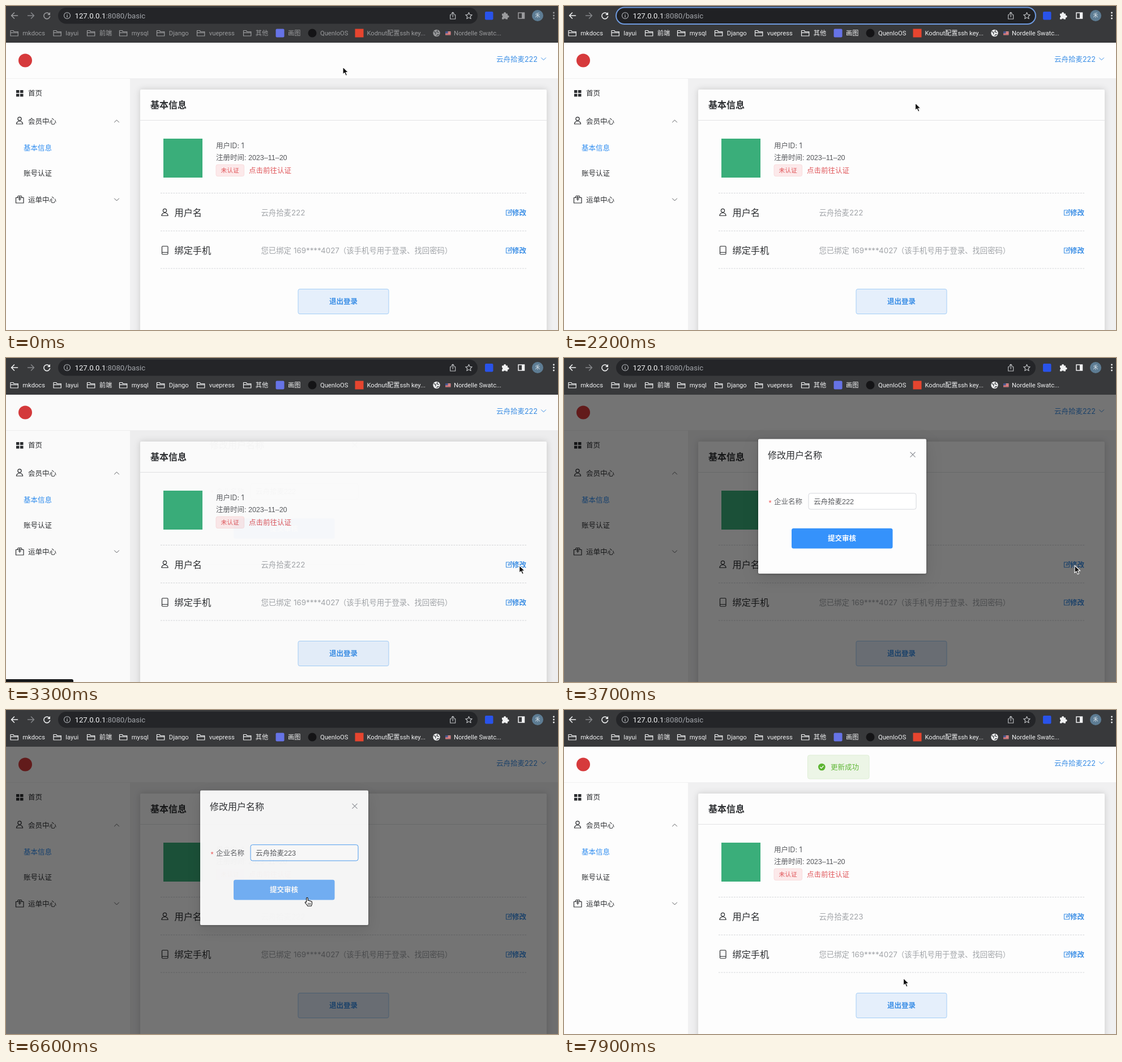
Animation of 975x574 px, one loop 8000 ms. Source, as an HTML page:

```html
<!DOCTYPE html>
<html lang="zh-CN">
<head>
<meta charset="utf-8">
<title>基本信息</title>
<style>
html, body { margin: 0; width: 100%; height: 100%; overflow: hidden; background: #fdfdfd; }
svg { display: block; width: 100vw; height: 100vh; }
text { font-family: Inter, "Noto Sans CJK SC", "Noto Sans CJK", sans-serif; font-feature-settings: "calt" 0; white-space: pre; }
.chrome text { font-family: Roboto, "Noto Sans CJK SC", "Noto Sans CJK", sans-serif; }
.arial { font-family: "Liberation Sans", "Noto Sans CJK SC", "Noto Sans CJK", sans-serif; }
.cjk { font-family: "Noto Sans CJK SC", "Noto Sans CJK", sans-serif; }
.line { fill: none; stroke-linecap: round; stroke-linejoin: round; }
#card { filter: drop-shadow(0 0 6px rgba(0,0,0,.16)); }
#panel { filter: drop-shadow(0 1px 2px rgba(0,0,0,.25)) drop-shadow(0 8px 14px rgba(0,0,0,.1)); }
</style>
</head>
<body>
<svg id="stage" viewBox="0 0 975 574" preserveAspectRatio="none"></svg>
<script>
const LOOP = 8000;
const NAME = '云舟拾麦';
const BLUE = '#3a8ee6';
const INK = '#2c2e31';

// ---- drawing helpers (text is placed by its vertical centre) ----
const text = (x, cy, s, size = 12.5, fill = INK, more = '') =>
  `<text x="${x}" y="${cy + size * 0.37}" font-size="${size}" fill="${fill}" ${more}>${s}</text>`;
const rect = (x, y, w, h, fill, more = '') =>
  `<rect x="${x}" y="${y}" width="${w}" height="${h}" fill="${fill}" ${more}/>`;
const circle = (x, y, r, fill, more = '') =>
  `<circle cx="${x}" cy="${y}" r="${r}" fill="${fill}" ${more}/>`;
const line = (d, color, w = 1.1, more = '') =>
  `<path class="line" d="${d}" stroke="${color}" stroke-width="${w}" ${more}/>`;
const bold = 'font-weight="700"';
const semi = 'font-weight="500"';
const arial = 'class="arial"';

// ---- browser frame ----
function folder(x) {
  return line(`M${x} 43.5h4.5l1.8 2h7v7.5h-13.3zM${x} 47.3h13.3`, 'currentColor', 1.2);
}

function chrome() {
  const c = 'currentColor';
  const marks = [[8, 'mkdocs'], [84, 'layui'], [143.5, '前端'], [200.5, 'mysql'],
    [266.5, 'Django'], [337.5, 'vuepress'], [419.5, '其他']];
  const label = (x, s) => text(x, 48, s, 11.2, c);
  return `<g class="chrome" id="chrome">
    ${rect(0, 0, 975, 65, '#38393b')}
    ${rect(92, 3, 741, 28.5, '#242528', 'rx="14.2"')}
    <g id="ring">${rect(92, 2.5, 741, 29.5, '#202124', 'rx="14.7" stroke="#6f9be0" stroke-width="2"')}</g>
    ${line('M20.5 17h-11M14.5 12l-5 5 5 5', c, 1.6)}
    ${line('M38.5 17h11M44.5 12l5 5-5 5', '#85878a', 1.5)}
    ${line('M76.3 13.8A5.4 5.4 0 1 0 77.5 18.6', c, 1.6)}
    <path d="M78 11v5h-5z" fill="${c}"/>
    ${circle(108, 17, 5.5, 'none', 'stroke="#b4b7bb" stroke-width="1.1"')}
    ${line('M108 16.5v3.3M108 14.1v.1', '#b4b7bb', 1.3)}
    ${text(121.5, 17, '127.0.0.1<tspan fill="#a3a6ab">:8080/basic</tspan>', 13.2, '#f4f5f6')}
    ${line('M246.7 10.5v13.5', '#e8e8e8', 1, 'id="urlCaret"')}
    ${line('M787 15.5h-2.3v7.5h9v-7.5h-2.3M789.2 19.5v-8M786.7 13.7l2.5-2.5 2.5 2.5', '#c3c5c8', 1.1)}
    ${line('M817.5 11.5l1.7 3.8 4.1.4-3.1 2.8.9 4.1-3.6-2.2-3.6 2.2.9-4.1-3.1-2.8 4.1-.4z', '#c9cbce', 1.1)}
    ${rect(846, 10, 14.5, 14.5, '#2953ea', 'rx="2"')}
    <path d="M876 13.5h3.2a2 2 0 1 1 3.8 0h3v3.2a2 2 0 1 1 0 3.8v3h-3.2a1.9 1.9 0 0 0-3.6 0h-3.2v-3.2a1.9 1.9 0 0 0 0-3.6z" fill="${c}"/>
    ${rect(905, 12, 10.5, 10, 'none', `stroke="${c}" stroke-width="1.5"`)}${rect(911, 12, 4.5, 10, c)}
    ${circle(939, 17, 10, '#5d7c93')}
    ${text(934.5, 17, '禾', 9, '#e6edf2')}
    ${[12, 17, 22].map(y => circle(967.5, y, 1.4, c)).join('')}
    ${marks.map(([x, s]) => folder(x) + label(x + 21.3, s)).join('')}
    ${rect(476.5, 40.5, 15, 15, '#6673e6', 'rx="2"')}${label(498, '画图')}
    ${circle(541, 48, 7.5, '#141416')}${label(555, 'QuenloOS')}
    ${rect(616.5, 40.5, 15, 15, '#e6452f')}${label(637.5, 'Kodnut配置ssh key...')}
    ${circle(760.5, 48, 6.2, c)}
    ${line('M756 45.5l3 1.5-.5 2.5M762 43l-1 2.5 3 1.5M761 52.5l1.5-2 2 .3', '#505356', 1.5)}
    ${rect(776, 45, 9.5, 6.5, '#d9a0a0')}${line('M776.5 47h8.5M776.5 50h8.5', '#c43c44', 1)}${rect(776, 45, 4.5, 3.5, '#44558f')}
    ${label(791, 'Nordelle Swatc...')}
  </g>`;
}

// ---- page ----
const person = (x, y) =>
  circle(x, y - 3, 3.1, 'none', `stroke="${INK}" stroke-width="1.2"`) +
  line(`M${x - 5.6} ${y + 6}a5.6 5 0 0 1 11.2 0z`, INK, 1.2);

const edit = y => line(`M889 ${y - 4.2}h-5.5v9h9v-5.5M887 ${y + 1.3}l.4-1.9 5-5 1.6 1.6-5 5z`, BLUE) +
  text(894, y, '修改', 12.5, BLUE, bold);

const dashes = y => line(`M273 ${y}H919`, '#d3d5d8', 1, 'stroke-dasharray="2.7 1.8" style="stroke-linecap:butt"');

function page() {
  const grey = '#a2a5a9';
  const red = '#e0565a';
  return `
    ${rect(0, 65, 975, 509, '#fdfdfd')}
    ${rect(219, 128, 756, 446, '#f0f0f1')}
    ${rect(0, 128, 219, 1, '#f0f0f0')}
    ${circle(34, 96.5, 12, '#d63a3c')}
    ${text(866, 94, NAME + '222', 12.5, BLUE)}
    ${line('M945.5 91.8l4 4 4-4', BLUE, 1)}

    ${[[18, 149], [25, 149], [18, 155.5], [25, 155.5]].map(([x, y]) => rect(x, y, 5.5, 5, INK)).join('')}
    ${text(39, 154, '首页')}
    ${person(24, 203)}${text(39, 204, '会员中心')}
    ${line('M191.5 206l4-4 4 4', '#5b5d60', 1)}
    ${text(31, 251.5, '基本信息', 12.5, '#2f8df0')}
    ${text(31, 296, '账号认证')}
    ${line('M17.5 339.5h13.5v9.5h-13.5zM20 339.5l1.5-3h5.5l1.5 3M24.25 336.5v8M22 342h4.5', INK, 1.2)}
    ${text(39, 343, '运单中心')}
    ${line('M191.5 341l4 4 4-4', '#5b5d60', 1)}

    <g id="card">${rect(237, 148, 718, 440, '#fdfdfd', 'rx="2"')}</g>
    ${text(255, 175.5, '基本信息', 16, INK, bold)}
    ${rect(237, 202, 718, 1, '#e2e3e5')}
    ${rect(278, 235, 69, 69, '#3aae7a')}
    ${text(371, 247, '用户ID: 1', 12.5, '#55575b')}
    ${text(371, 268, '注册时间: 2023–11–20', 12.5, '#55575b', arial)}
    ${rect(371, 281, 49.5, 20.5, '#fce9ea', 'rx="3" stroke="#f9dcdd"')}
    ${text(379.5, 291.3, '未认证', 10.7, red)}
    ${text(429, 291.5, '点击前往认证', 12.5, red)}
    ${[331.5, 398.5, 465].map(dashes).join('')}
    ${person(280.5, 365.5)}${text(297.5, 366, '用户名', 16.2, INK, semi)}
    ${text(450.5, 366, NAME + '<tspan id="rowNum">222</tspan>', 13.35, grey)}
    ${edit(366)}
    ${rect(275.5, 425.5, 10.5, 14.5, 'none', `rx="1.5" stroke="${INK}" stroke-width="1.2"`)}${line('M276 436.5h9.5', INK)}
    ${text(297.5, 433, '绑定手机', 16.2, INK, semi)}
    ${text(450.5, 433, '您已绑定', 13.35, grey)}
    ${text(508, 433, '169****4027', 13.35, grey)}
    ${text(588, 433, '（该手机号用于登录、找回密码）', 13.35, grey, 'class="cjk"')}
    ${edit(433)}
    ${rect(516, 501.5, 160, 44, '#e5effb', 'rx="3" stroke="#a3cdf7"')}
    ${text(571, 523.5, '退出登录', 12.5, BLUE, bold)}`;
}

function dialog() {
  return `
    ${rect(0, 65, 975, 509, '#000', 'id="shade"')}
    <g id="panel">
      ${rect(343, 143.5, 297, 238.5, '#fdfdfd', 'rx="2"')}
      ${text(360, 172, '修改用户名称', 16)}
      ${line('M611.8 167l8.4 8.4M620.2 167l-8.4 8.4', '#909399')}
      ${text(361.5, 256, '*', 13, '#f05050', arial)}
      ${text(371, 254, '企业名称', 12.5, '#606266')}
      ${rect(432, 239.7, 190, 28.3, '#fff', 'id="field" rx="3.5"')}
      ${text(441, 254, NAME + '<tspan id="fieldNum">222</tspan>', 12.5, '#55575b', arial)}
      ${rect(0, 247, 1, 14, '#222', 'id="caret"')}
      ${rect(402, 301.7, 178.5, 35.8, '#3592fb', 'id="submit" rx="3.5"')}
      ${text(466, 319.5, '提交审核', 12.5, '#fff', bold)}
    </g>`;
}

function toast() {
  return `<g clip-path="url(#view)"><g id="toast">
    ${rect(430.5, 80, 108.5, 42, '#ecf5e6', 'rx="3.5" stroke="#deeed5"')}
    ${circle(455.3, 101, 6.3, '#5cb531')}
    ${line('M452.5 101.2l2 2 3.6-4', '#fff', 1.3)}
    ${text(471, 101, '更新成功', 12.5, '#62b839')}
  </g></g>`;
}

function pointers() {
  const beam = 'M-3-7.5q3 0 3 2.5v10q0 2.5-3 2.5M3-7.5q-3 0-3 2.5M0 5q0 2.5 3 2.5M-1.8 2h3.6';
  return `
    <path id="arrow" d="M0 0v13.2l3-2.8 2.2 5 2.4-1-2.2-4.9h4.3z" fill="#111" stroke="#fff" stroke-width="1.1" stroke-linejoin="round"/>
    <g id="beam">${line(beam, '#fff', 2.4)}${line(beam, '#111', 1.2)}</g>
    <g id="hand">
      <path d="M-1.4 8V1.2a1.3 1.3 0 0 1 2.6 0V5q2-.6 2.6.7 2-.5 2.5.8 2.1-.3 2.1 1.7v2.6q0 1.8-1.3 4h-6.300q-1.500-3-4-5.200-.9-1.400.2-2 .8-.3 1.600.4z" fill="#fff" stroke="#111" stroke-width="1.1" stroke-linejoin="round"/>
      ${line('M1.700 9.500v3M3.700 9.500v3M5.700 9.500v3', '#111', 0.8)}
    </g>`;
}

document.getElementById('stage').innerHTML =
  `<defs><clipPath id="view">${rect(0, 65, 975, 509, '#fff')}</clipPath></defs>` +
  page() + dialog() + toast() +
  `<path id="status" d="M0 569h116q3 0 3 3v2H0z" fill="#17181a"/>` +
  chrome() + pointers();

const el = {};
document.querySelectorAll('[id]').forEach(n => el[n.id] = n);

// ---- timing ----
const clamp = v => Math.max(0, Math.min(1, v));
const span = (t, a, b) => clamp((t - a) / (b - a));
const smooth = k => k * k * (3 - 2 * k);

// CSS "ease" curve
function ease(x) {
  if (x <= 0 || x >= 1) return clamp(x);
  let lo = 0, hi = 1;
  for (let i = 0; i < 20; i++) {
    const s = (lo + hi) / 2;
    if (0.75 * s * (1 - s) + s ** 3 < x) lo = s; else hi = s;
  }
  return 0.3 * lo * (1 - lo) ** 2 + 3 * lo * lo * (1 - lo) + lo ** 3;
}

const path = [
  [0, 595, 108], [100, 595, 108], [500, 512.5, 16], [1900, 512.5, 16],
  [2300, 640, 200], [2850, 907, 367.5], [3250, 907, 367.5], [3600, 902, 367.5],
  [3750, 902, 367.5], [4350, 557.5, 249], [6000, 557.5, 249], [6400, 532, 332.5],
  [6950, 532, 332.5], [7700, 599.5, 475], [LOOP, 599.5, 475]
];

function pointerAt(t) {
  let i = 1;
  while (i < path.length - 1 && path[i][0] <= t) i++;
  const [t0, x0, y0] = path[i - 1], [t1, x1, y1] = path[i];
  const k = smooth(span(t, t0, t1));
  return [x0 + (x1 - x0) * k, y0 + (y1 - y0) * k];
}

const inside = (x, y, l, top, r, b) => x > l && x < r && y > top && y < b;
const show = (node, on) => node.setAttribute('visibility', on ? 'visible' : 'hidden');
const write = (node, s) => { if (node.textContent !== s) node.textContent = s; };
const blink = (t, from) => (t - from) % 1000 < 500;

function render(t) {
  // address bar
  const typing = t >= 500 && t < 2300;
  el.chrome.setAttribute('color', t < 500 ? '#9a9b9d' : '#f0f1f2');
  show(el.ring, typing);
  show(el.urlCaret, typing && blink(t, 500));
  el.status.setAttribute('opacity', span(t, 3050, 3150) * (1 - span(t, 3350, 3500)));

  // dialog
  const enter = ease(span(t, 3290, 3590)), leave = ease(span(t, 6580, 6880));
  const open = t >= 3290 && t < 6880;
  el.shade.setAttribute('opacity', 0.54 * enter * (1 - ease(span(t, 6600, 6900))));
  el.panel.setAttribute('opacity', enter * (1 - leave));
  el.panel.setAttribute('transform', `translate(0 ${-17.8 * (1 - enter + leave)})`);

  // name field
  const digits = t < 5100 ? '222' : t < 5800 ? '22' : '223';
  const lastKey = t < 5100 ? 4600 : t < 5800 ? 5100 : 5800;
  write(el.fieldNum, digits);
  el.field.setAttribute('stroke', t < 4600 ? '#d5d7dc' : '#4a9df5');
  el.caret.setAttribute('x', 491 + 6.95 * digits.length);
  show(el.caret, t >= 4600 && t < 6400 && blink(t, lastKey));

  // result
  write(el.rowNum, t < 6700 ? '222' : '223');
  el.toast.setAttribute('opacity', ease(span(t, 6600, 6900)));
  el.toast.setAttribute('transform', `translate(0 ${-42 * (1 - ease(span(t, 6600, 7000)))})`);

  // pointer
  const [x, y] = pointerAt(t);
  const onButton = open && inside(x, y, 402, 302, 580, 338);
  const onText = inside(x, y, 92, 2, 833, 32) || (open && inside(x, y, 432, 240, 622, 268));
  const kind = onButton ? 'hand' : onText ? 'beam' : 'arrow';
  const hidden = t >= 5100 && t < 6000;
  for (const id of ['arrow', 'beam', 'hand']) {
    show(el[id], id === kind && !hidden);
    el[id].setAttribute('transform', `translate(${x} ${y})`);
  }
  el.submit.setAttribute('fill', onButton ? '#71b1f9' : '#3592fb');
}

const start = performance.now();
function tick() {
  render((performance.now() - start) % LOOP);
  requestAnimationFrame(tick);
}
tick();
</script>
</body>
</html>
```
